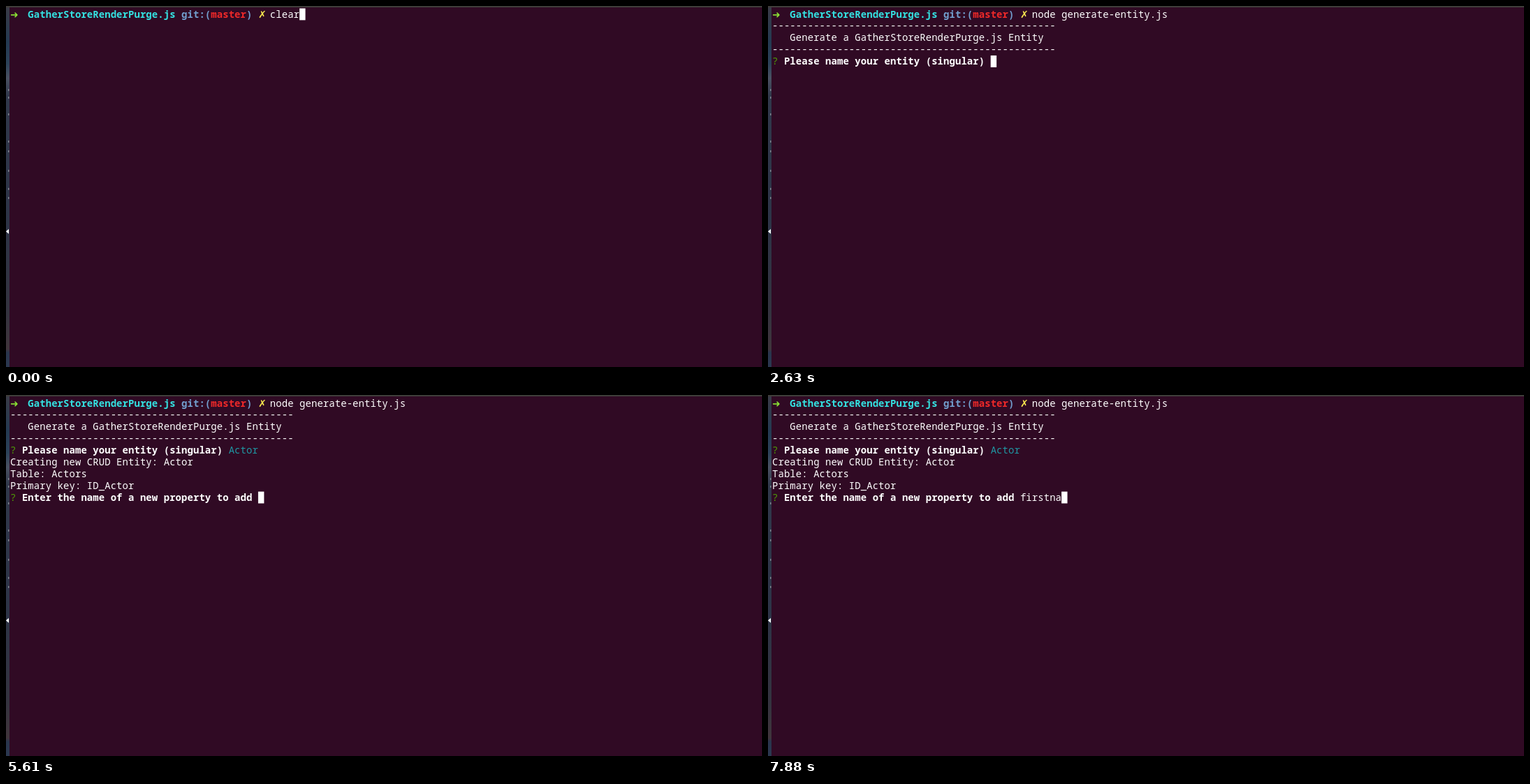
These frames come from a looping animation (1082x518 px, 8 s). An HTML page with a canvas:

```html
<!DOCTYPE html>
<html lang="en">
<head>
<meta charset="utf-8">
<title>Terminal</title>
<style>
  html, body { margin: 0; width: 100%; height: 100%; overflow: hidden; background: #300a24; }
  canvas { display: block; }
</style>
</head>
<body>
<canvas id="stage" width="1082" height="518"></canvas>
<script>
const ctx = document.getElementById('stage').getContext('2d');
const LOOP = 8000;
const CELL_W = 8.45, CELL_H = 16.9, LEFT = 6, TOP = 3.4, ASCENT = 13.1;
const MONO = '13.9px "Noto Sans Mono", "DejaVu Sans Mono", monospace';
const SYMBOL = '14px "DejaVu Sans", sans-serif';
const WHITE = '#ffffff', GREEN = '#4e9a06', LIME = '#8ae234', AQUA = '#34e2e2',
      BLUE = '#729fcf', RED = '#ef2929', YELLOW = '#fce94f', TEAL = '#1f98a4';

const PROJECT = 'GatherStoreRenderPurge.js';
const COMMAND = 'node generate-entity.js';
const RULE = '-'.repeat(48);
const ASK_NAME = 'Please name your entity (singular)';
const ASK_PROP = 'Enter the name of a new property to add';

// Each entry: start time, typed text, cursor shown
const shell = [
  [0, 'clear', 1], [140, 'clera', 1], [670, 'clear', 1],
  [745, COMMAND, 0], [820, COMMAND, 1], [1370, COMMAND, 0]
];
const nameInput = [
  [1640, '', 1], [2070, '', 0], [2630, '', 1], [3070, 'A', 1], [3360, 'Ac', 1],
  [3600, 'Act', 1], [3690, 'Acto', 1], [3830, 'Actor', 1], [4380, 'Actor', 0],
  [4420, 'Actor', 1]
];
const propInput = [
  [4460, '', 1], [5030, '', 0], [5610, '', 1], [6200, '', 0], [6270, '', 1],
  [6340, 'f', 1], [6430, 'fi', 1], [6510, 'fir', 1], [6650, 'firs', 1],
  [6740, 'first', 1], [7010, 'firstn', 1], [7190, 'firstna', 1],
  [7480, 'firstnam', 1], [7880, 'firstna', 1]
];

const stateAt = (steps, t) => steps.filter(s => s[0] <= t).pop();
const colX = col => LEFT + col * CELL_W;
const rowY = row => TOP + row * CELL_H;

function print(text, col, row, color = WHITE, bold = false) {
  ctx.font = (bold ? 'bold ' : '') + MONO;
  ctx.letterSpacing = '0px';
  ctx.letterSpacing = (CELL_W - ctx.measureText('0').width) + 'px';
  ctx.fillStyle = color;
  ctx.fillText(text, colX(col), rowY(row) + ASCENT);
}

function symbol(char, col, color) {
  ctx.font = 'bold ' + SYMBOL;
  ctx.letterSpacing = '0px';
  ctx.fillStyle = color;
  ctx.fillText(char, colX(col), rowY(0) + ASCENT);
}

function cursor(col, row) {
  ctx.fillStyle = WHITE;
  ctx.fillRect(colX(col), rowY(row), CELL_W, CELL_H);
}

function input(steps, t, col, row) {
  const [, text, shown] = stateAt(steps, t);
  print(text, col, row);
  if (shown) cursor(col + text.length, row);
}

function question(text, row) {
  print('?', 0, row, GREEN);
  print(text, 2, row, WHITE, true);
}

function backdrop() {
  ctx.fillStyle = '#300a24';
  ctx.fillRect(0, 0, 1082, 518);

  // Sliver of desktop at the left edge
  const g = ctx.createLinearGradient(0, 0, 0, 518);
  [[0, '#3a3b46'], [0.1, '#243a52'], [0.16, '#2c4259'], [0.2, '#4a5162'],
   [0.25, '#30384b'], [0.6, '#2d3447'], [0.85, '#34333f'], [0.95, '#40353c'],
   [0.96, '#29354d'], [1, '#2b3850']].forEach(([at, c]) => g.addColorStop(at, c));
  ctx.fillStyle = g;
  ctx.fillRect(0, 0, 5, 518);
  ctx.fillStyle = '#7c818c';
  [119, 130, 154, 193, 207, 235, 261, 274].forEach(y => ctx.fillRect(3, y, 1.5, 3));

  ctx.fillStyle = WHITE;
  ctx.beginPath();
  ctx.moveTo(0, 323.5);
  ctx.lineTo(4, 320);
  ctx.lineTo(4, 327);
  ctx.fill();

  ctx.fillStyle = '#3f3d3a';
  ctx.fillRect(0, 0, 1082, 2);
}

function prompt() {
  symbol('➜', 0, LIME);
  print(PROJECT, 3, 0, AQUA, true);
  print('git:(', 29, 0, BLUE, true);
  print('master', 34, 0, RED, true);
  print(')', 40, 0, BLUE, true);
  symbol('✗', 42, YELLOW);
}

function draw(t) {
  backdrop();
  prompt();
  input(shell, t, 44, 0);
  if (t < 1640) {
    if (t >= 1490) cursor(0, 1);
    return;
  }
  print(RULE, 0, 1);
  print('Generate a ' + PROJECT + ' Entity', 3, 2);
  print(RULE, 0, 3);
  question(ASK_NAME, 4);
  if (t < 4460) {
    input(nameInput, t, 37, 4);
    return;
  }
  print('Actor', 37, 4, TEAL);
  print('Creating new CRUD Entity: Actor', 0, 5);
  print('Table: Actors', 0, 6);
  print('Primary key: ID_Actor', 0, 7);
  question(ASK_PROP, 8);
  input(propInput, t, 42, 8);
}

const start = performance.now();
function tick() {
  draw((performance.now() - start) % LOOP);
  requestAnimationFrame(tick);
}
tick();
</script>
</body>
</html>
```
